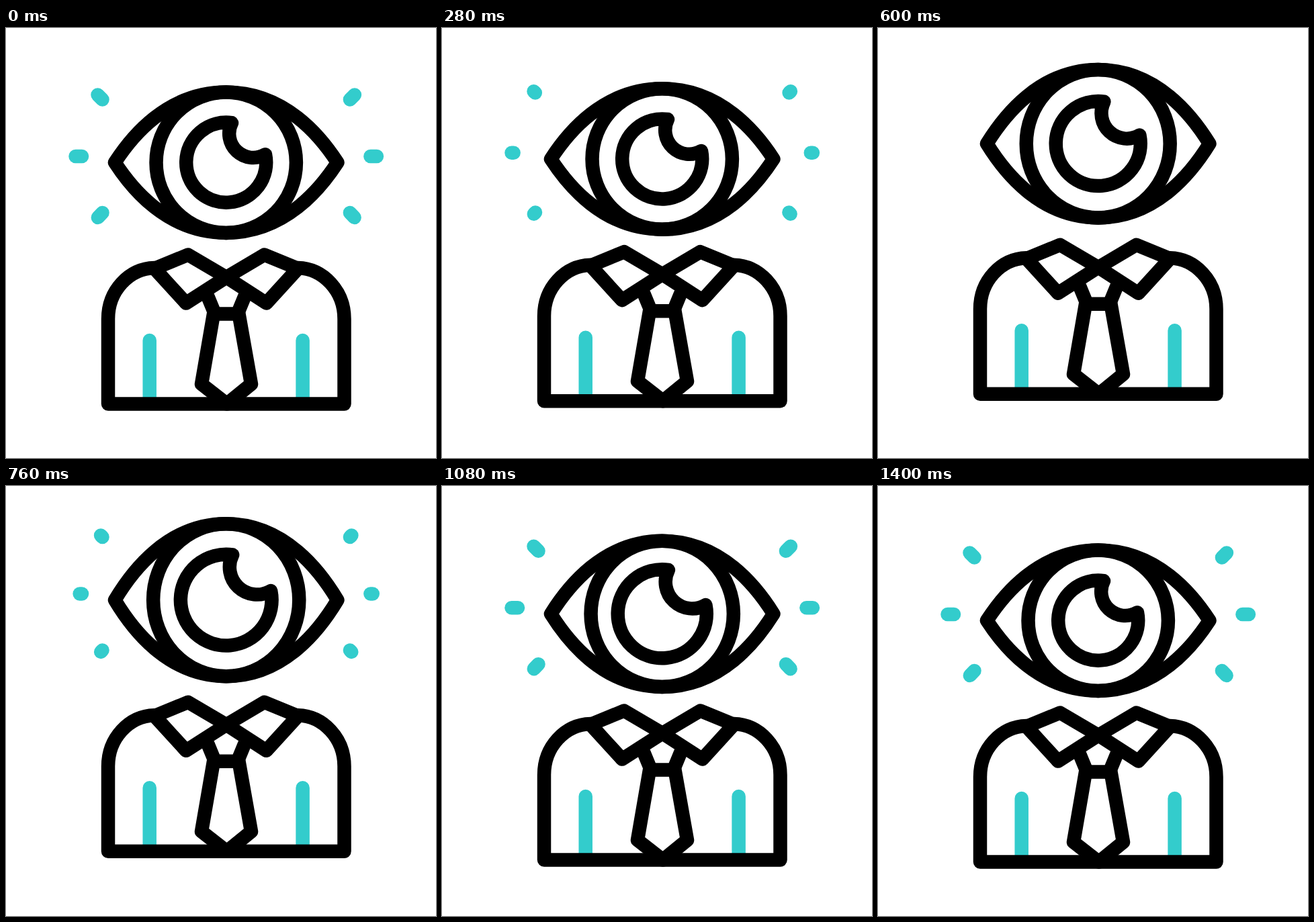
These frames come from a looping animation (640x640 px, 1.72 s). An HTML page:

```html
<!DOCTYPE html>
<html lang="en">
<head>
<meta charset="utf-8">
<title>Watchful businessman</title>
<style>
  html, body { margin: 0; width: 100%; height: 100%; overflow: hidden; background: #fff; }
  svg { display: block; width: 640px; height: 640px; }
  g { fill: none; stroke: #000; stroke-width: 20.5; stroke-linecap: round; stroke-linejoin: round; }
  .teal { stroke: #3cc; }
  .scaled { vector-effect: non-scaling-stroke; }
</style>
</head>
<body>
<svg viewBox="0 0 640 640">
  <g id="rays" class="teal"></g>
  <g id="body">
    <path class="teal" d="M213.7 465V555M441.6 465V555"/>
    <path d="M221 357C183 358 152 391 152 433V559.5H503.5V433C503.5 391 472 358 434.5 357"/>
    <path d="M221 358L271 337.5L328 371L268 409.5ZM434.5 358L384.5 337.5L328 371L387.5 409.5Z"/>
    <path d="M300.5 400L311 425.5H344.5L355 400"/>
    <path d="M309 425.5L291 530L328.8 559.5L365 530L346.5 425.5"/>
  </g>
  <!-- The eye is drawn around its own centre. -->
  <g id="eye">
    <path id="lid" class="scaled" d="M-165.7 0C-141 -38 -88 -104.7 0 -104.7S141 -38 165.7 0C141 38 88 104.7 0 104.7S-141 38 -165.7 0Z"/>
    <ellipse id="iris"/>
    <path id="pupil" class="scaled" d="M8.3 -59A59.5 59.5 0 1 0 58.3 -12A35.8 35.8 0 0 1 8.3 -59Z"/>
  </g>
</svg>
<script>
const LOOP = 1720, STEP = 40, CENTER_X = 327.7, EYE_Y = 200.2;
const $ = id => document.getElementById(id);

// Each ray runs from its inner end to its outer end; the right side is mirrored.
const leftRays = [[143.5, 106.5, 136.5, 99.5], [113, 191, 103.5, 191], [143.5, 275, 136.8, 282]];
const rays = leftRays.flatMap(([x1, y1, x2, y2]) =>
  [[x1, y1, x2, y2], [2 * CENTER_X - x1, y1, 2 * CENTER_X - x2, y2]]);
const rayPaths = rays.map(() => {
  const path = document.createElementNS('http://www.w3.org/2000/svg', 'path');
  return $('rays').appendChild(path);
});

function ease(t, start, end) {
  const x = Math.min(1, Math.max(0, (t - start) / (end - start)));
  return x * x * (3 - 2 * x);
}

// Rises to 1, holds, then falls back to 0.
const pulse = (t, rise, top, fall, end) => ease(t, rise, top) - ease(t, fall, end);

function drawRays(t, lift) {
  const from = t < 500 ? ease(t, 120, 380) : 0;
  const to = t < 500 ? 1 : ease(t, 640, 940);
  rays.forEach(([x1, y1, x2, y2], i) => {
    const at = k => `${x1 + (x2 - x1) * k} ${y1 + (y2 - y1) * k}`;
    rayPaths[i].setAttribute('d', to > from ? `M${at(from)}L${at(to)}` : '');
  });
  $('rays').setAttribute('transform', `translate(0 ${-lift})`);
}

function draw(t) {
  const bodyLift = 15.8 * pulse(t, 60, 700, 741, 1211);
  const eyeLift = 30.5 * pulse(t, 130, 700, 779, 1264);
  const widen = 8.8 * pulse(t, 400, 740, 829, 1297);
  const pupilScale = 1 + 0.148 * pulse(t, 440, 812, 920, 1400);

  $('body').setAttribute('transform', `translate(0 ${-bodyLift})`);
  $('eye').setAttribute('transform', `translate(${CENTER_X} ${EYE_Y - eyeLift})`);
  $('lid').setAttribute('transform', `scale(1 ${1 + widen / 104.7})`);
  $('iris').setAttribute('rx', 104.2 + widen / 2);
  $('iris').setAttribute('ry', 104.7 + widen);
  $('pupil').setAttribute('transform', `scale(${pupilScale})`);
  drawRays(t, eyeLift);
}

const began = performance.now();
function tick() {
  const t = (performance.now() - began) % LOOP;
  draw(Math.floor(t / STEP) * STEP);
  requestAnimationFrame(tick);
}
tick();
</script>
</body>
</html>
```
